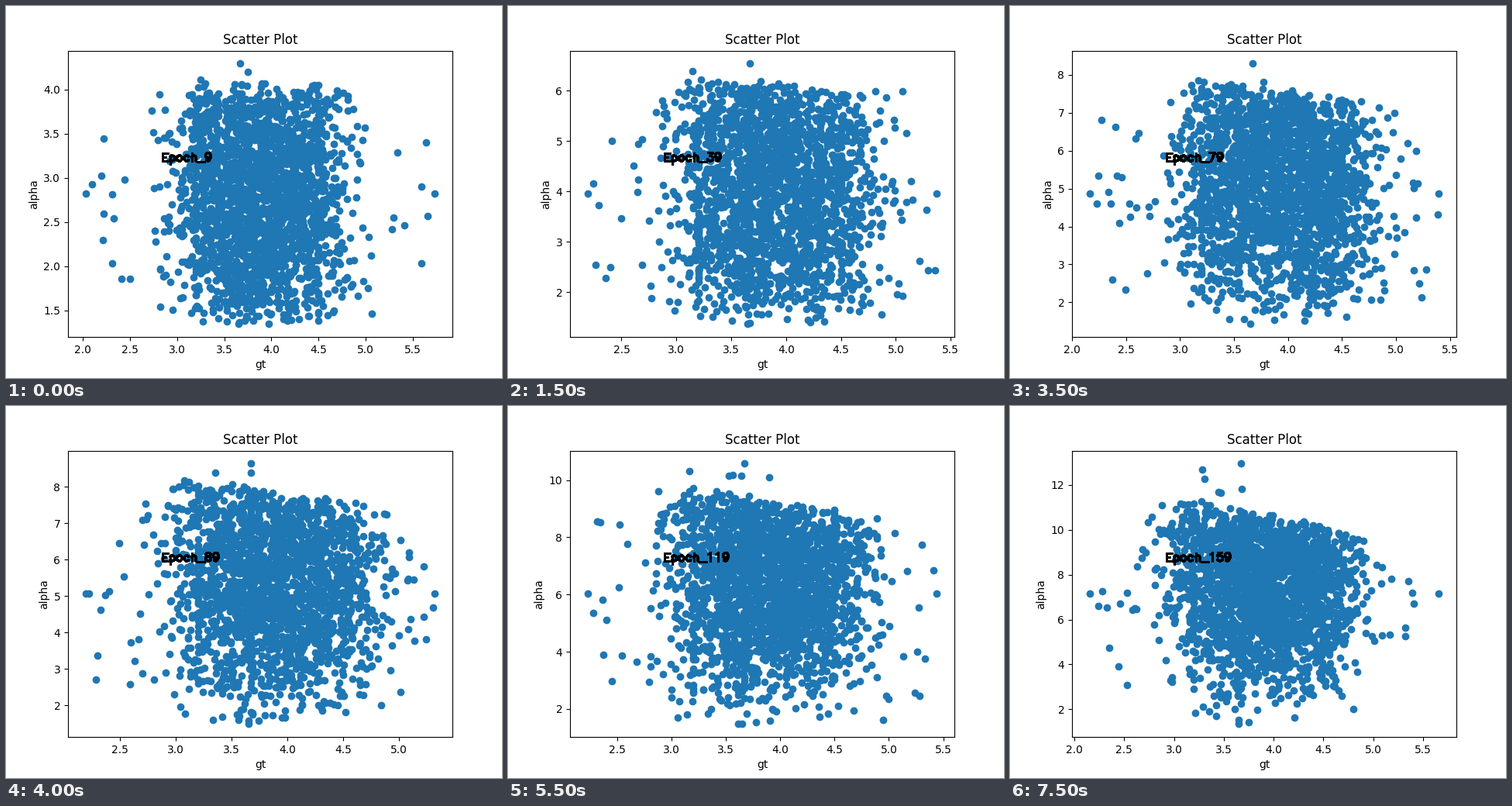
Write a matplotlib script that moves like this. It is 640x480 px and loops after 8 s.

```python
import numpy as np
import matplotlib.pyplot as plt
from matplotlib.animation import FuncAnimation
from matplotlib.lines import Line2D

W, H = 640, 480
FRAMES, INTERVAL = 16, 500
POINTS = 2150

# Key steps and the data range there: x min, x max, y min, y max
STEPS = [0, 2, 5, 8, 10, 13, 15]
RANGES = np.array([
    (2.029, 5.734, 1.347, 4.290),
    (2.233, 5.287, 1.394, 5.994),
    (2.103, 5.550, 1.312, 7.622),
    (2.190, 5.322, 1.485, 8.630),
    (2.230, 5.319, 1.440, 10.238),
    (2.228, 5.688, 1.540, 11.245),
    (2.152, 5.659, 1.348, 12.935),
])
COLUMNS = [3.2, 3.67, 4.5]  # gt values that occur often


def cloud(i):
    """Sampled points; the cloud climbs and leans left as training goes on."""
    rng = np.random.default_rng(40 + i)
    x0, x1, y0, y1 = (np.interp(i, STEPS, col) for col in RANGES.T)
    age = i / (FRAMES - 1)

    # Flat core with soft flanks
    x = 3.9 + rng.uniform(-0.65, 0.65, POINTS) + rng.normal(0, 0.25, POINTS)
    x = np.where(rng.random(POINTS) < 0.05, rng.choice(COLUMNS, POINTS), x)
    u = rng.beta(1.7 + 1.1 * age, 1.6, POINTS)
    u = np.where(rng.random(POINTS) < 0.05, rng.random(POINTS), u)
    top = (0.95 - 0.12 * age**2) * y1 - 0.9 * age * np.clip(x - 3.9, -0.8, 0.8)
    y = y0 + (top - y0) * u

    # Strays left, right and above, then one point on each limit
    mid, span = (y0 + y1) / 2, y1 - y0
    sx = np.r_[rng.uniform(x0, 2.9, 16), rng.uniform(4.95, x1, 8),
               rng.normal(3.5, 0.2, 5), x0, x1, 3.67, 3.65]
    sy = np.r_[rng.uniform(y0 + 0.1 * span, y1 - 0.2 * span, 16),
               rng.uniform(y0 + 0.1 * span, y1 - 0.3 * span, 8),
               y1 - rng.uniform(0.02, 0.12, 5) * span, mid, mid, y1, y0]
    keep = (x > x0) & (x < x1)
    return np.r_[x[keep], sx], np.r_[y[keep], sy]


def arc(cx, cy, rx, ry, a=0, b=360):
    t = np.radians(np.linspace(a, b, 25))
    return list(zip(cx + rx * np.cos(t), cy + ry * np.sin(t)))


# Stroke font: advance width and pen strokes, capitals 21 units high
GLYPHS = {
    "E": (19, [[(17, 21), (4, 21), (4, 0), (17, 0)], [(4, 11), (12, 11)]]),
    "p": (19, [[(4, 14), (4, -7)], arc(9.5, 7, 6.5, 7, 145, -145)]),
    "o": (19, [arc(9.5, 7, 6.5, 7)]),
    "c": (18, [arc(9.5, 7, 6.5, 7, 35, 325)]),
    "h": (19, [[(4, 21), (4, 0)], [(4, 10)] + arc(10, 9, 5, 5, 130, 0) + [(15, 0)]]),
    "_": (18, [[(0, -2), (18, -2)]]),
    "0": (20, [arc(10, 10.5, 7, 10.5)]),
    "1": (20, [[(6, 17), (8, 18), (11, 21), (11, 0)]]),
    "2": (20, [arc(10, 15.5, 6, 5.5, 175, -30) + [(3, 0), (17, 0)]]),
    "3": (20, [[(5, 21), (16, 21), (10, 13)] + arc(10, 6.5, 7, 6.5, 75, -160)]),
    "4": (20, [[(13, 0), (13, 21), (3, 7), (18, 7)]]),
    "5": (20, [[(15, 21), (5, 21), (4, 12)] + arc(10, 7, 7, 7, 125, -155)]),
    "6": (20, [arc(10.5, 6.5, 6.5, 6.5), arc(11, 9, 7, 12, 50, 190)]),
    "7": (20, [[(3, 21), (17, 21), (7, 0)]]),
    "8": (20, [arc(10, 16.7, 6, 4.3), arc(10, 6.2, 7, 6.2)]),
    "9": (20, [arc(9.5, 14.5, 6.5, 6.5), arc(9, 12, 7, 12, 10, -130)]),
}


def stroke_text(text, x, y, scale=0.5):
    """Pen lines for text whose baseline starts at pixel (x, y)."""
    lines = []
    for ch in text:
        width, strokes = GLYPHS[ch]
        for stroke in strokes:
            px, py = np.array(stroke).T * scale
            lines.append(Line2D((x + px) / W, 1 - (y - py) / H,
                                transform=fig.transFigure, color="black",
                                lw=1.8, antialiased=False,
                                solid_capstyle="round", solid_joinstyle="round"))
        x += width * scale
    return lines


fig, ax = plt.subplots(figsize=(W / 100, H / 100), dpi=100)
label = []


def draw(i):
    ax.clear()
    ax.scatter(*cloud(i))
    ax.set(title="Scatter Plot", xlabel="gt", ylabel="alpha")
    while label:
        label.pop().remove()
    for line in stroke_text(f"Epoch_{10 * i + 9}", 200, 200):
        label.append(fig.add_artist(line))
    return []


anim = FuncAnimation(fig, draw, frames=FRAMES, interval=INTERVAL,
                     repeat=True, repeat_delay=0)
plt.show()
```
